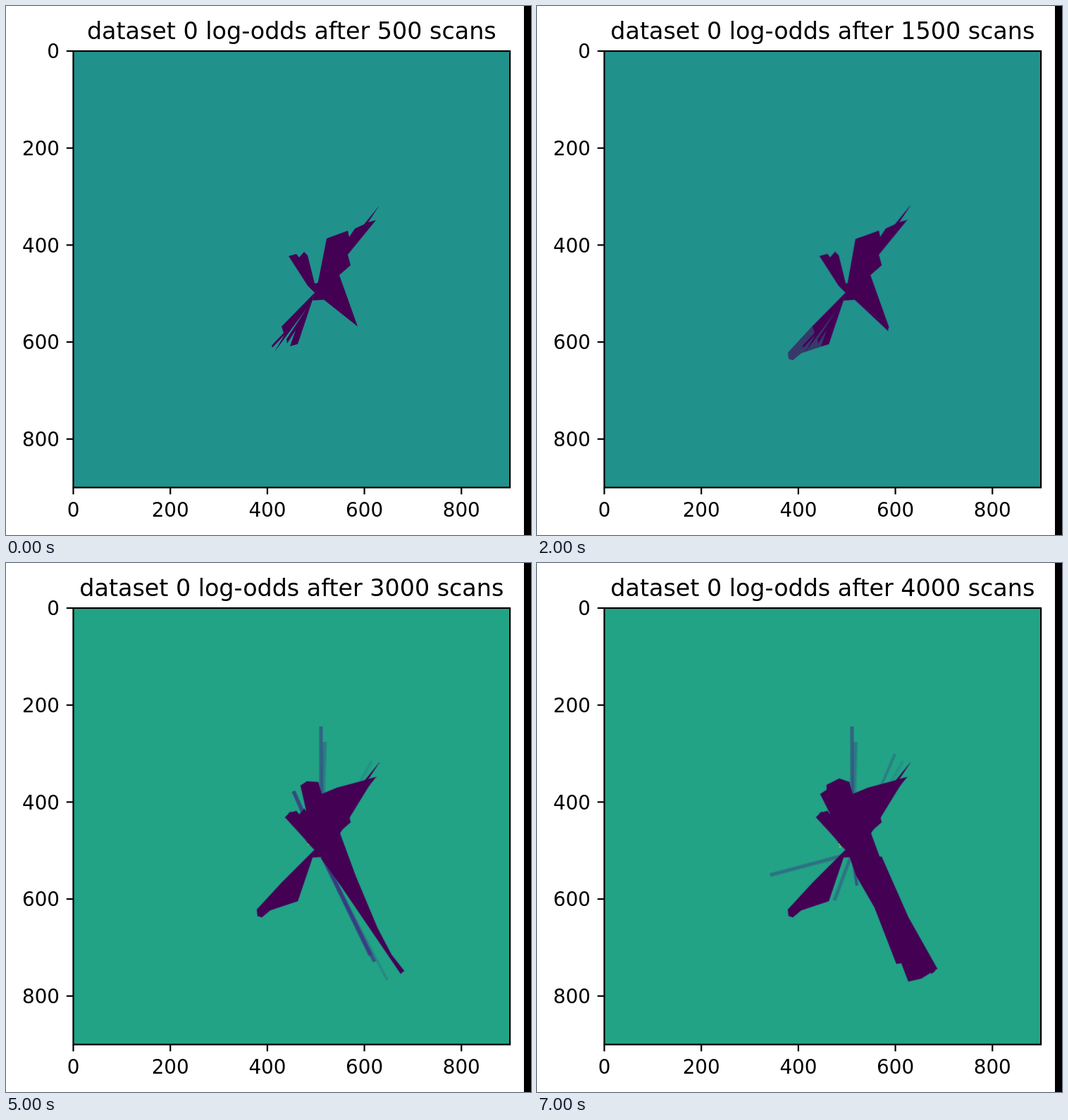
An HTML page with a canvas for the animation above (8 s loop, 745 px wide and 751 px high).

```html
<!DOCTYPE html>
<html lang="en">
<head>
<meta charset="utf-8">
<title>Log-odds map</title>
<style>
  html, body { margin: 0; width: 100%; height: 100%; overflow: hidden; background: #fff; }
  canvas { display: block; }
</style>
</head>
<body>
<canvas id="stage" width="745" height="751"></canvas>
<script>
const ctx = document.getElementById('stage').getContext('2d');
const STEP = 1000, STEPS = 8;
const LEFT = 95.5, TOP = 64, SIZE = 619.6, UNIT = SIZE / 900;
const FREE = '#440154', FAINT = '#3b3581';
const SENSOR = [447, 412];

const outline = points => new Path2D(`M${points}Z`);

const wing = outline('438 407 428 397 401 355 412 352 416 357 423 349 428 354 438 394 443 393');
const torso = outline('438 407 443 391 455 330 485 319 487 328 495 316 508 310 530 283 514 307 525 304 485 353 489 368 473 382 499 455 451 417 435 418');
const armRays = outline('438 407 391 455 394 464 377 482 378 485 395 467 381 491 427 429 398 473 399 479 411 460 403 483 414 480 435 417');
const arm = outline('438 407 391 454 356 492 357 501 363 503 375 493 414 480 435 418');
const torsoEdge = outline('441 393 452 331 458 329 453 395');
const wedgeEdge = outline('451 417 498 461 499 455');
const wingEdge = outline('438 407 396 361 404 353');
const crown = outline('438 404 418 316 427 310 443 311 448 328 470 319 522 305 470 390');
const crownLeft = outline('438 404 416 356 402 328 411 322 411 315 429 306 443 311');
const corridor = outline('447 419 475 458 560 583 565 579 547 556 527 518 496 444 473 382');
const corridorWide = outline('443 415 453 444 479 489 510 569 517 568 527 594 545 590 568 576 527 503 489 417');

function background(step) {
  if (step < 4) return '#21918c';
  return step === 4 ? '#1f9c89' : '#22a385';
}

function regionsAt(step) {
  const shown = [wing, torso, step < 3 ? armRays : arm];
  if (step > 1) shown.push(torsoEdge, wedgeEdge);
  if (step > 4) shown.push(wingEdge, crown, corridor);
  if (step > 5) shown.push(crownLeft, corridorWide);
  return shown;
}

function line(x1, y1, x2, y2) {
  ctx.beginPath();
  ctx.moveTo(x1, y1);
  ctx.lineTo(x2, y2);
  ctx.stroke();
}

// Soft-edged sensor ray ending at x, y
function beam(x, y, opacity, width = 5) {
  ctx.strokeStyle = FAINT;
  ctx.globalAlpha = opacity * .6;
  for (const scale of [1.2, .6]) {
    ctx.lineWidth = width * scale;
    line(...SENSOR, x, y);
  }
  ctx.globalAlpha = 1;
}

function drawBeams(step) {
  if (step === 4) {
    beam(456, 254, .24, 4);
    beam(394, 360, .22, 3);
  }
  if (step > 4) {
    beam(447, 232, .6);
    beam(452, 254, .35, 6);
    beam(519, 281, .14, 4);
  }
  if (step === 5) {
    beam(408, 324, 1);
    beam(517, 557, .85);
    beam(523, 566, .8);
    beam(541, 592, .2, 4);
  }
  if (step > 5) beam(508, 271, .3, 4);
  if (step === 7) {
    beam(331, 443, .45);
    beam(422, 479, .4);
    beam(454, 458, .75, 4);
  }
}

function drawMap(step) {
  ctx.fillStyle = background(step);
  ctx.fillRect(LEFT, TOP, SIZE, SIZE);
  drawBeams(step);
  ctx.fillStyle = FREE;
  if (step === 2) {
    ctx.globalAlpha = .6;
    ctx.fill(arm);
    ctx.globalAlpha = 1;
  }
  const shown = regionsAt(step);
  if (step > 1) {
    ctx.strokeStyle = FAINT;
    ctx.lineWidth = 2;
    ctx.globalAlpha = .3;
    shown.forEach(region => ctx.stroke(region));
    ctx.globalAlpha = 1;
  }
  shown.forEach(region => ctx.fill(region));
  if (step > 4) {
    ctx.fillStyle = '#8fd744';
    ctx.fillRect(428, 399, 2, 1);
    if (step === 7) ctx.fillRect(429, 402, 2, 2);
  }
}

function drawAxes(step) {
  ctx.strokeStyle = ctx.fillStyle = '#000';
  ctx.lineWidth = 2.2;
  ctx.strokeRect(LEFT, TOP, SIZE, SIZE);
  ctx.font = '27.78px "DejaVu Sans", sans-serif';
  const bottom = TOP + SIZE;
  for (let value = 0; value <= 800; value += 200) {
    const x = LEFT + value * UNIT, y = TOP + value * UNIT;
    line(x, bottom, x, bottom + 9.7);
    line(LEFT - 9.7, y, LEFT, y);
    ctx.textAlign = 'center';
    ctx.fillText(value, x, 725);
    ctx.textAlign = 'right';
    ctx.fillText(value, 76, y + 10.3);
  }
  ctx.textAlign = 'center';
  ctx.font = '33.33px "DejaVu Sans", sans-serif';
  ctx.fillText(`dataset 0 log-odds after ${(step + 1) * 500} scans`, LEFT + SIZE / 2, 47);
}

function draw(now) {
  const step = Math.floor(now / STEP) % STEPS;
  ctx.fillStyle = '#fff';
  ctx.fillRect(0, 0, 745, 751);
  drawMap(step);
  drawAxes(step);
  ctx.fillRect(735, 0, 10, 751);
}

const start = performance.now();
function tick() {
  draw(performance.now() - start);
  requestAnimationFrame(tick);
}
tick();
</script>
</body>
</html>
```
